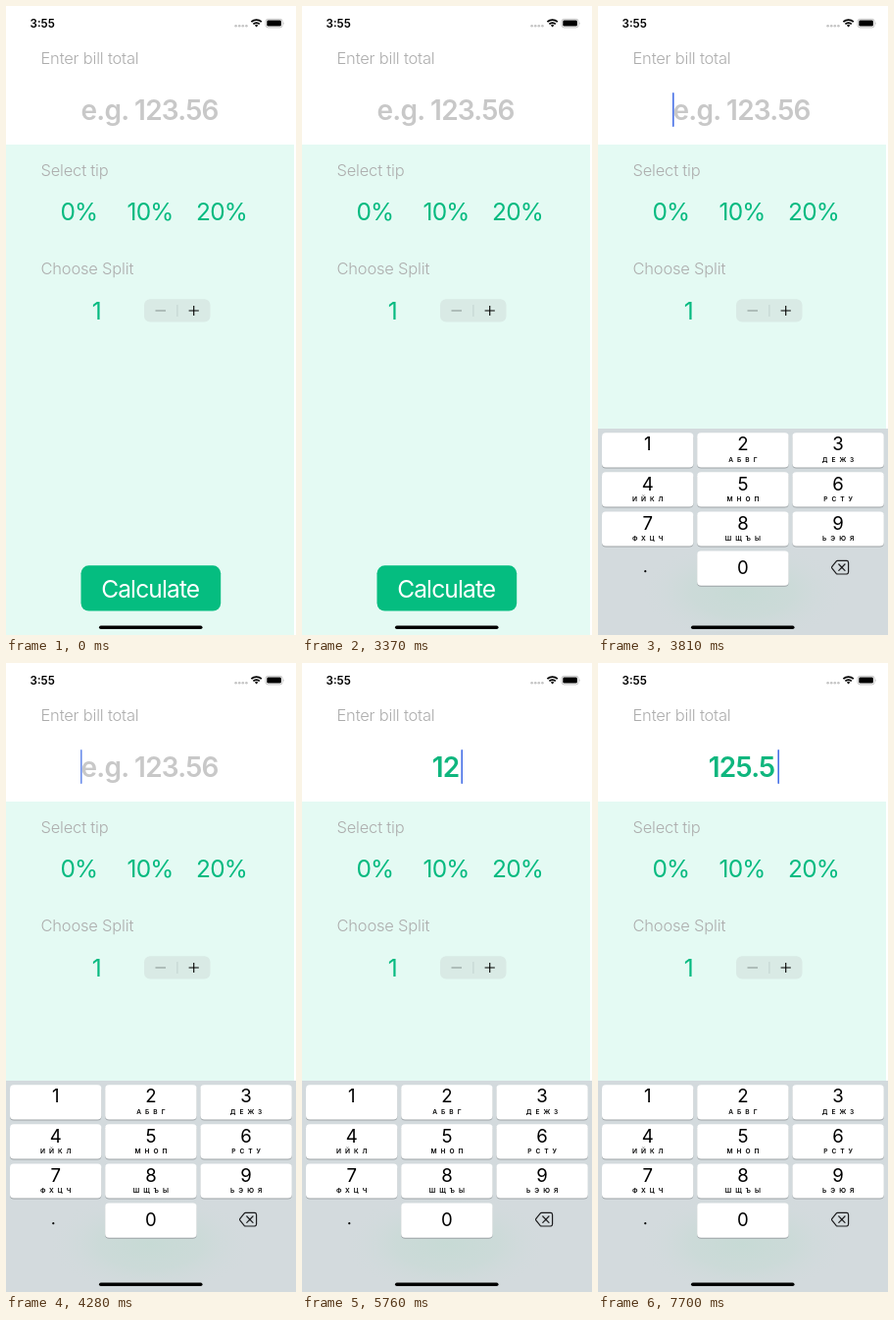
Animation, 296 px wide and 640 px high, one loop 8000 ms. Source, as an HTML page:

```html
<!DOCTYPE html>
<html lang="en">
<head>
<meta charset="utf-8">
<title>Tip calculator</title>
<style>
html, body { margin: 0; width: 100%; height: 100%; overflow: hidden; background: #fff; }
svg { display: block; width: 296px; height: 640px; font-family: Inter, "Noto Sans", sans-serif; }
.label { font-size: 16.5px; font-weight: 350; fill: #adadad; letter-spacing: -.012em; }
.bill { font-size: 28px; font-weight: 600; letter-spacing: -.027em; text-anchor: middle; }
.tip { font-size: 24.5px; fill: #06ba80; letter-spacing: -.035em; text-anchor: middle; }
.digit { font-size: 18.6px; text-anchor: middle; }
.letters { font-size: 6.6px; font-weight: 600; letter-spacing: 4px; text-anchor: middle; }
</style>
</head>
<body>
<svg id="stage" viewBox="0 0 296 640">
  <defs>
    <radialGradient id="glow">
      <stop offset="0" stop-color="#c7dad5"/>
      <stop offset=".5" stop-color="#cadad7" stop-opacity=".8"/>
      <stop offset="1" stop-color="#d3dadd" stop-opacity="0"/>
    </radialGradient>
  </defs>
  <rect width="296" height="640" fill="#fff"/>
  <rect y="141" width="294" height="499" fill="#e4faf3"/>

  <text x="24.5" y="22" font-size="11.6" font-weight="600">3:55</text>
  <g fill="#c4c4c4">
    <circle cx="234.6" cy="20.2" r="1.3"/><circle cx="238.2" cy="20.2" r="1.3"/>
    <circle cx="241.8" cy="20.2" r="1.3"/><circle cx="245.4" cy="20.2" r="1.3"/>
  </g>
  <g fill="none" stroke="#000" stroke-width="1.7">
    <path d="M250.4 16.2a7.4 7.4 0 0 1 10.4 0M252.4 18.4a4.5 4.5 0 0 1 6.4 0"/>
    <path d="M255.6 21.4l-1.6-1.7a2.2 2.2 0 0 1 3.2 0z" fill="#000" stroke="none"/>
  </g>
  <rect x="265" y="13.3" width="17.2" height="8.6" rx="2.5" fill="none" stroke="#b4b4b4" stroke-width=".8"/>
  <rect x="266.3" y="14.6" width="14.6" height="6" rx="1.4"/>
  <path d="M283.2 16.2q1.3 1.4 0 2.8z" fill="#b4b4b4"/>

  <text class="label" x="35.5" y="58.5">Enter bill total</text>
  <text class="label" x="35.5" y="172.5">Select tip</text>
  <text class="label" x="35.5" y="272.5">Choose Split</text>
  <text class="bill" id="bill" x="146.6" y="116"></text>
  <rect id="caret" y="88" width="1.6" height="35" rx=".8" fill="#4670e6"/>

  <text class="tip" x="74.3" y="218.3">0%</text>
  <text class="tip" x="147" y="218.3">10%</text>
  <text class="tip" x="220" y="218.3">20%</text>
  <text class="tip" x="92.3" y="319">1</text>

  <rect x="141" y="298.3" width="67.5" height="23.2" rx="6" fill="#d9eae5"/>
  <path d="M174.9 304v12" stroke="#c3d3cf"/>
  <path d="M152.5 310h10.5" stroke="#8c9995" stroke-width="1.1"/>
  <path d="M186.6 310h10.2M191.7 304.9v10.2" stroke="#000" stroke-width="1.1"/>

  <rect x="76.5" y="569.3" width="142.7" height="46.3" rx="8" fill="#05bd80"/>
  <text class="tip" x="147.2" y="601.5" style="fill:#fff">Calculate</text>

  <g id="keys">
    <rect width="296" height="216" fill="#d3dadd"/>
    <ellipse cx="147.5" cy="166" rx="105" ry="52" fill="url(#glow)"/>
  </g>
  <rect x="95" y="630.5" width="105.5" height="3.5" rx="1.75"/>
</svg>
<script>
const LOOP = 8000, KEY_TOP = 425;
const $ = id => document.getElementById(id);
const keys = $('keys'), bill = $('bill'), caret = $('caret');

function add(tag, attrs, text = '') {
  const el = document.createElementNS('http://www.w3.org/2000/svg', tag);
  for (const k in attrs) el.setAttribute(k, attrs[k]);
  el.textContent = text;
  return keys.appendChild(el);
}

const caps = {};
const letters = ['', 'АБВГ', 'ДЕЖЗ', 'ИЙКЛ', 'МНОП', 'РСТУ', 'ФХЦЧ', 'ШЩЪЫ', 'ЬЭЮЯ'];
function addKey(name, col, row, sub) {
  const x = 4 + col * 97.2, y = 4.2 + row * 40.1, box = { x, width: 93.4, height: 35.2, rx: 4 };
  add('rect', { ...box, y: y + 1, fill: '#9da3a6' });
  caps[name] = add('rect', { ...box, y, fill: '#fff' });
  add('text', { class: 'digit', x: x + 46.7, y: y + (row < 3 ? 18.2 : 23.6) }, name);
  if (sub) add('text', { class: 'letters', x: x + 48.7, y: y + 29.3 }, sub);
}
letters.forEach((sub, i) => addKey(String(i + 1), i % 3, Math.floor(i / 3), sub));
addKey('0', 1, 3);
add('circle', { cx: 48.3, cy: 145.2, r: 1.1 });
add('path', {
  d: 'M244.6 134.4h9q2 0 2 2v9.6q0 2-2 2h-9q-.9 0-1.5-.7l-4.2-5.2q-.6-.9 0-1.8l4.2-5.2q.6-.7 1.5-.7zM245.8 138l6.2 6.4M252 138l-6.2 6.4',
  fill: 'none', stroke: '#1c1c1e', 'stroke-width': 1.2, 'stroke-linecap': 'round'
});

// Each track lists [start time, value]; a value holds until the next one.
const alphas = [[0, 0], [500, 1], [1330, 0], [1570, .5], [1690, 1], [2230, .9], [2350, 0],
  [2590, .5], [2710, 1], [3250, .8], [3360, 0], [3700, .6], [3810, 1], [4280, .8], [4390, 0],
  [4630, .5], [4750, 1], [6730, 0], [6900, 1]];
const typed = [[0, ''], [5390, '1'], [5760, '12'], [6160, '125'], [6900, '125.'], [7520, '125.5']];
const presses = [[0, ''], [5030, '1'], [5390, ''], [5490, '2'], [5760, ''], [6030, '5'],
  [6160, ''], [7380, '5'], [7520, '']];
const slides = [0, 3490, 3600, 3700, 3810, 3920, 4280].map(t => [t, t]);
const caretX = [76, 154, 162.4, 171.2, 175.4, 183.4];

const at = (track, t) => track.filter(s => s[0] <= t).pop()[1];

// Critically damped spring
function keyboardTop(t) {
  const x = Math.max(0, (t - 3507) * .0186);
  return Math.round(KEY_TOP + 215 * (1 + x) * Math.exp(-x));
}

function draw(t) {
  const text = at(typed, t), down = at(presses, t);
  bill.textContent = text || 'e.g. 123.56';
  bill.setAttribute('fill', text ? '#0fb67e' : '#c8c8c8');
  caret.setAttribute('x', caretX[text.length]);
  caret.setAttribute('opacity', at(alphas, t));
  keys.setAttribute('transform', `translate(0 ${keyboardTop(at(slides, t))})`);
  for (const k in caps) caps[k].setAttribute('fill', k === down ? '#bccad4' : '#fff');
}

function tick() {
  draw(performance.now() % LOOP);
  requestAnimationFrame(tick);
}
tick();
</script>
</body>
</html>
```
